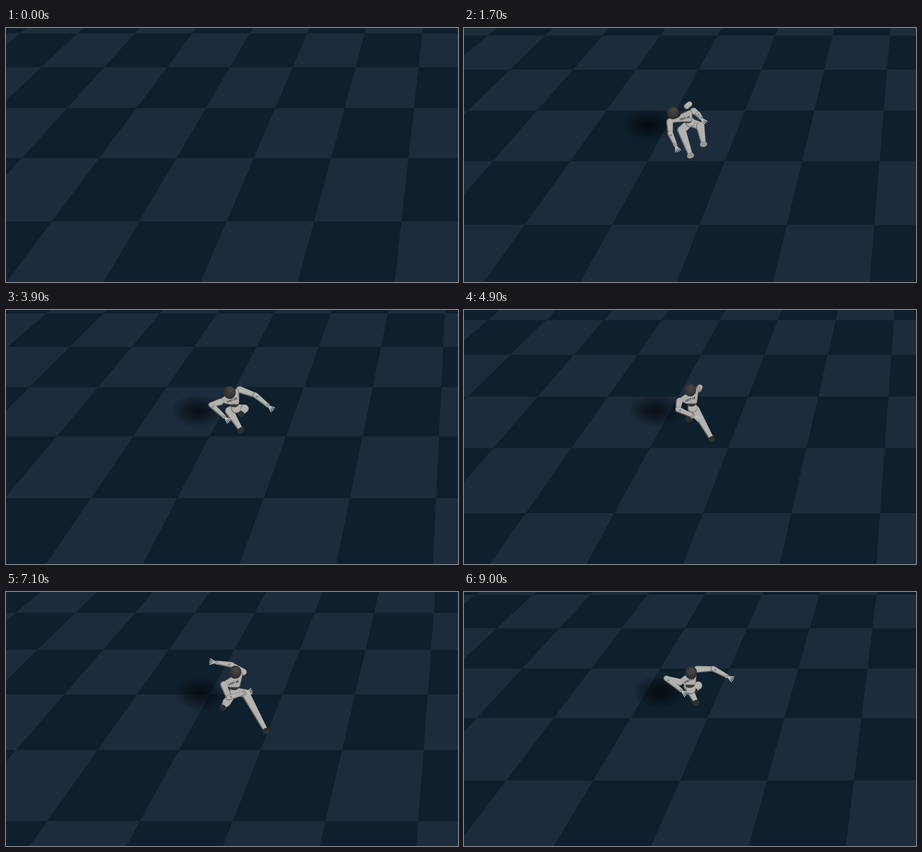
Recreate the animation shown at these times as an HTML page with a canvas. Size 800 by 450 pixels, loop 9.1 s.

```html
<!DOCTYPE html>
<html lang="en">
<head>
<meta charset="utf-8">
<title>Robot on a checkered floor</title>
<style>
  html, body { margin: 0; width: 100%; height: 100%; overflow: hidden; background: #0f212e; }
  canvas { display: block; width: 100vw; height: 100vh; }
</style>
</head>
<body>
<canvas id="stage" width="800" height="450"></canvas>
<script>
const ctx = document.getElementById('stage').getContext('2d');
const LOOP = 9100, STEP = 100;

// Floor perspective: vanishing point and depth scale
const VX = 807, VY = -630, DEPTH = 0.000842;

// time, column offset, row offset, slope
const camera = [
  [0, -3.693, 7.68, 0.159],
  [1700, -3.524, 6.682, 0.158],
  [2700, -3.237, 7.06, 0.1572],
  [3900, -3.3, 7.777, 0.1585],
  [5800, -3.579, 7.399, 0.1583],
  [7100, -3.471, 7.233, 0.1585],
  [9000, -3.76, 7.72, 0.1596]
];

// time, then x,y of: head, pelvis, shoulder/elbow/wrist A,
// shoulder/elbow/wrist B, knee/foot A, knee B
const poses = [
  [1700, 370, 150, 400, 167, 364, 166, 365, 187, 374, 207, 406, 147, 414, 153, 419, 159, 385, 181, 401, 226, 418, 174],
  [2700, 383, 123, 396, 161, 374, 146, 347, 138, 366, 150, 408, 128, 431, 147, 439, 166, 384, 167, 405, 206, 415, 170],
  [3900, 396, 146, 407, 174, 379, 163, 363, 168, 386, 189, 413, 141, 441, 151, 463, 169, 395, 179, 416, 213, 422, 175],
  [5800, 404, 138, 402, 172, 383, 160, 392, 183, 421, 187, 418, 138, 397, 125, 371, 121, 422, 176, 458, 242, 388, 192],
  [9000, 402, 143, 401, 172, 382, 160, 358, 153, 384, 174, 412, 137, 441, 136, 465, 149, 396, 167, 411, 196, 414, 166]
];

// The lunge is held: it only settles a little, with wrist A lifted
const held = poses[3].map((v, i) => i ? v + (i % 2 ? 2 : 4) : 7100);
held[10] -= 12;
poses.splice(4, 0, held);

const lerp = (a, b, u) => a + (b - a) * u;
const mix = (p, q, u) => p.map((v, i) => lerp(v, q[i], u));
const ease = u => u * u * (3 - 2 * u);

function sample(keys, t) {
  const i = keys.findIndex(k => k[0] >= t);
  if (i <= 0) return keys[i ? keys.length - 1 : 0];
  const a = keys[i - 1], b = keys[i];
  return mix(a, b, ease((t - a[0]) / (b[0] - a[0])));
}

function polygon(points) {
  ctx.beginPath();
  points.forEach(p => ctx.lineTo(...p));
  ctx.closePath();
}

function ellipse(x, y, rx, ry, fill, angle = 0) {
  ctx.beginPath();
  ctx.ellipse(x, y, rx, ry, angle, 0, 7);
  ctx.fillStyle = fill;
  ctx.fill();
}

function floor(col, row, slope) {
  ctx.fillStyle = '#1c2c3d';
  ctx.fillRect(0, 0, 800, 450);
  ctx.fillStyle = '#0e202d';
  const corner = (m, j) => {
    const d = (row + j) * DEPTH;
    return [VX + (col + m) / d, VY + 1 / (slope * d)];
  };
  for (let j = -3; j < 7; j++)
    for (let m = -7; m < 7; m++)
      if ((j + m) & 1) {
        polygon([corner(m, j), corner(m + 1, j), corner(m + 1, j + 1), corner(m, j + 1)]);
        ctx.fill();
      }
}

function shadow(x, y) {
  ctx.save();
  ctx.translate(x, y);
  ctx.scale(1, 0.62);
  const g = ctx.createRadialGradient(0, 0, 4, 0, 0, 48);
  g.addColorStop(0, 'rgba(4,8,12,.75)');
  g.addColorStop(0.4, 'rgba(4,8,12,.5)');
  g.addColorStop(1, 'rgba(4,8,12,0)');
  ellipse(0, 0, 48, 48, g);
  ctx.restore();
}

function taper(a, b, r1, r2, fill) {
  const t = Math.atan2(b[1] - a[1], b[0] - a[0]);
  ctx.beginPath();
  ctx.arc(...a, r1, t + Math.PI / 2, t - Math.PI / 2);
  ctx.arc(...b, r2, t - Math.PI / 2, t + Math.PI / 2);
  ctx.fillStyle = fill;
  ctx.fill();
}

function limb(a, b, r1, r2) {
  taper(a, b, r1, r2, '#747473');
  const lit = p => [p[0] + 0.7, p[1] - 0.6];
  taper(lit(a), lit(b), r1 - 1, r2 - 1, '#b3b2ae');
}

function arm(s, e, w) {
  limb(s, e, 6, 4.5);
  limb(e, w, 5, 3.5);
  ellipse(...mix(e, w, 0.15), 2, 2, '#858583');
  const t = Math.atan2(w[1] - e[1], w[0] - e[0]);
  ctx.strokeStyle = '#c0bfbb';
  ctx.lineWidth = 1.6;
  ctx.lineCap = 'round';
  for (let i = -1.5; i < 2; i++) {
    const f = t + i * 0.25;
    ctx.beginPath();
    ctx.moveTo(...w);
    ctx.lineTo(w[0] + 13 * Math.cos(f), w[1] + 13 * Math.sin(f));
    ctx.stroke();
  }
  ellipse(...w, 3.2, 3.2, '#9a9996');
}

function leg(hip, knee, foot, shade) {
  limb(hip, knee, 7, 7.5);
  limb(knee, foot, 7.5, 4);
  const t = Math.atan2(foot[1] - knee[1], foot[0] - knee[0]);
  ellipse(...foot, 5, 6.5, `rgb(${shade},${shade},${shade - 2})`, t);
}

function robot(t) {
  const xy = sample(poses, t).slice(1);
  const at = i => [xy[2 * i], xy[2 * i + 1]];
  const [head, pelvis, sA, eA, wA, sB, eB, wB, kA, fA, kB] = [...Array(11).keys()].map(at);
  const chest = mix(sA, sB, 0.5);

  // 1 while bent forward with legs hanging, 0 once crouched
  const bent = 1 - ease(Math.min(1, Math.max(0, (t - 1700) / 1000)));
  const shade = lerp(46, 150, bent);
  const fB = [kB[0] + lerp(-6, 6, bent), kB[1] + lerp(9, 32, bent)];

  shadow(pelvis[0] - 78 + t * 0.0026, pelvis[1] + 5);
  if (bent > 0.5) limb([394, 139], [399, 135], 5, 5);

  arm(sB, eB, wB);
  leg(pelvis, kB, fB, shade);
  leg(pelvis, kA, fA, shade);
  limb(pelvis, mix(pelvis, chest, 0.1), 9, 8);
  ellipse(...mix(pelvis, chest, 0.3), 8, 5, '#393837');

  const waist = mix(pelvis, chest, 0.5);
  polygon([mix(sA, sB, 0.15), mix(sA, sB, 0.85), [waist[0] + 7, waist[1]], [waist[0] - 7, waist[1]]]);
  ctx.lineJoin = 'round';
  ctx.lineWidth = 9;
  ctx.strokeStyle = '#787877';
  ctx.stroke();
  ctx.lineWidth = 7;
  ctx.strokeStyle = ctx.fillStyle = '#adaca8';
  ctx.stroke();
  ctx.fill();

  ctx.save();
  ctx.translate(...mix(chest, pelvis, 0.38));
  ctx.rotate(0.6 * Math.atan2(sB[1] - sA[1], sB[0] - sA[0]));
  ctx.font = 'italic bold 5px "Liberation Sans", sans-serif';
  ctx.textAlign = 'center';
  ctx.fillStyle = '#292929';
  ctx.fillText('UNIT 08', 0, 1);
  ctx.restore();

  arm(sA, eA, wA);

  ellipse(...mix(head, chest, 0.3), 9, 8, '#292929');
  const g = ctx.createRadialGradient(head[0] + 2, head[1] - 5, 1, ...head, 13);
  g.addColorStop(0, '#4a4948');
  g.addColorStop(1, '#2a2a2a');
  ellipse(...head, 10.5, 11.5, g);
}

function draw(now) {
  const t = Math.floor(now % LOOP / STEP) * STEP;
  floor(...sample(camera, t).slice(1));
  if (t >= STEP) robot(t);
}

const start = performance.now();
function tick() {
  draw(performance.now() - start);
  requestAnimationFrame(tick);
}
tick();
</script>
</body>
</html>
```
